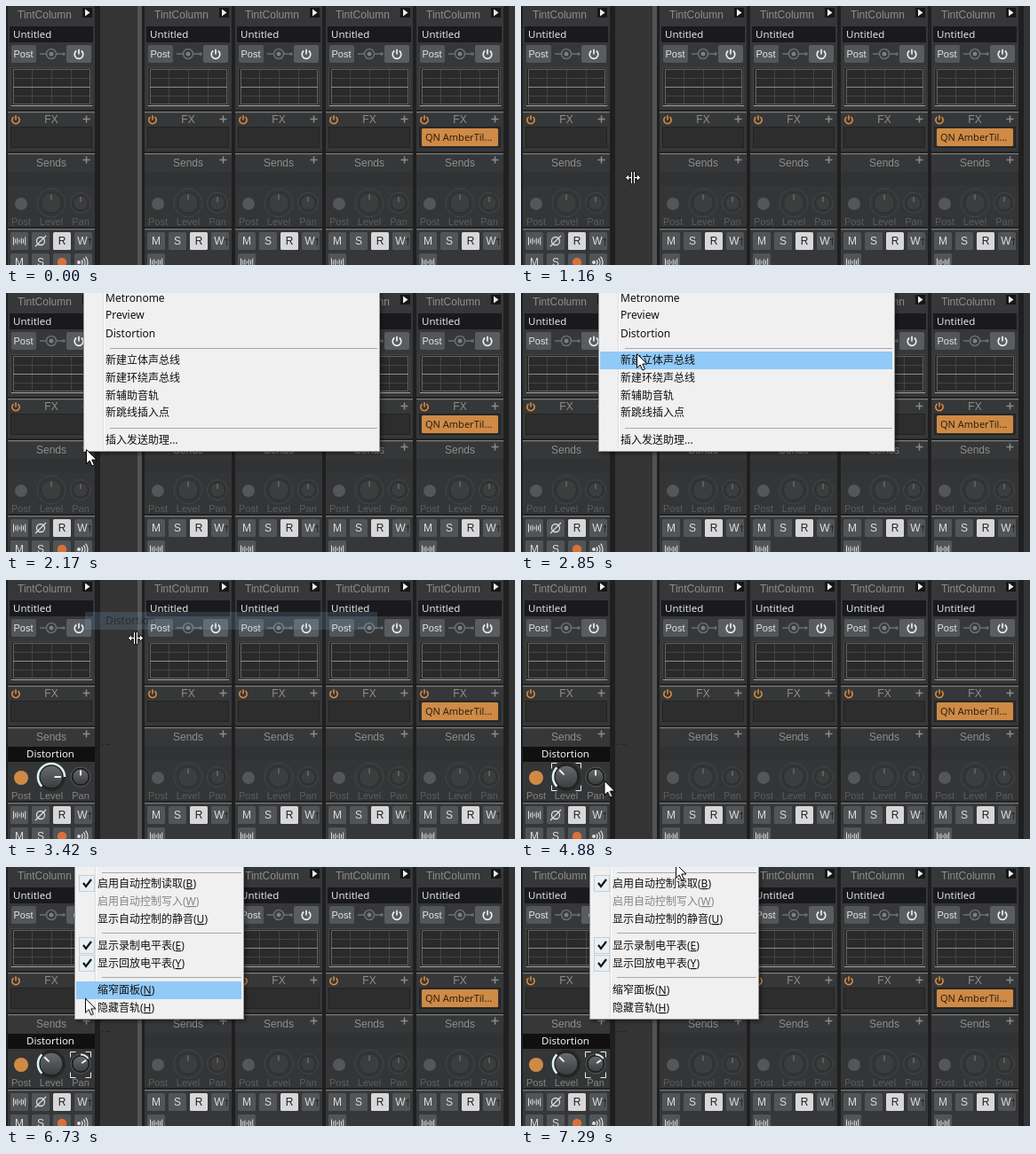
Recreate the animation shown at these times as an HTML page. Size 573x292 px, loop 8000 ms.

```html
<!DOCTYPE html>
<html lang="zh">
<head>
<meta charset="utf-8">
<title>Mixer console</title>
<style>
html, body { margin: 0; width: 100%; height: 100%; overflow: hidden; background: #343435; }
svg { display: block; width: 573px; height: 292px; }
text { font: 12px "Noto Sans", "Noto Sans CJK SC", sans-serif; }
.ui { font-family: "Liberation Sans", Arial, sans-serif; }
.head { fill: #8e8e8e; }
.small { font-size: 11px; }
.name { font-size: 11.5px; }
.mid { text-anchor: middle; }

.anim, .anim-step { animation: 8s linear infinite; }
.anim-step { animation-timing-function: step-end; }
#cursor { animation-name: travel; }
#arrow { animation-name: arrow; }
#resize { animation-name: resize; }
#idle { animation-name: idle; }
#active { animation-name: active; }
#menuA { animation-name: menuA; }
#menuB { animation-name: menuB; }
#hoverA { animation-name: hoverA; }
#hoverB { animation-name: hoverB; }
#ghost { animation-name: ghost; }
#levelHand { transform-origin: 51px 222px; animation-name: levelHand; }
#levelArc { animation-name: levelArc; }
#panHand { transform-origin: 84px 222px; animation-name: panHand; }
#panArc { animation-name: panArc; }
#levelFrame { animation-name: levelFrame; }
#panFrame { animation-name: panFrame; }

@keyframes travel {
  0%, 5.75% { transform: translate(376px, 296px); }
  10% { transform: translate(250px, 240px); }
  14.5%, 15.3% { transform: translate(126px, 193px); }
  15.4% { transform: translate(110px, 186px); }
  16.25% { transform: translate(100px, 178px); }
  19.5% { transform: translate(79px, 175px); }
  20.5%, 28.75% { transform: translate(90px, 176px); }
  31.25% { transform: translate(110px, 120px); }
  34.75% { transform: translate(128px, 77px); }
  37.4%, 39.25% { transform: translate(134px, 50px); }
  42.75%, 43.6% { transform: translate(146px, 65px); }
  45.5% { transform: translate(165px, 140px); }
  48.9% { transform: translate(177px, 226px); }
  50.6% { transform: translate(120px, 240px); }
  54.6% { transform: translate(46px, 224px); }
  57.5% { transform: translate(30px, 242px); }
  59.25% { transform: translate(56px, 240px); }
  61%, 61.8% { transform: translate(93.5px, 226px); }
  62.5% { transform: translate(88px, 224px); }
  65.6%, 66.5% { transform: translate(92px, 212px); }
  69.75% { transform: translate(214px, 238px); }
  70.6% { transform: translate(204px, 230px); }
  74.1%, 83.25% { transform: translate(78px, 172px); }
  86.25% { transform: translate(115px, 90px); }
  88.75% { transform: translate(150px, 30px); }
  90.25% { transform: translate(168px, 4px); }
  91.1%, 100% { transform: translate(174px, -4px); }
}
@keyframes arrow {
  0%, 15.9%, 44.2%, 51.5%, 68.1%, 73.4%, 100% { opacity: 1; }
  13.5%, 39.4%, 49.6%, 66.8%, 72% { opacity: 0; }
}
@keyframes resize {
  0%, 15.9%, 44.2%, 51.5%, 68.1%, 73.4%, 100% { opacity: 0; }
  13.5%, 39.4%, 49.6%, 66.8%, 72% { opacity: 1; }
}
@keyframes idle { 0% { opacity: 1; } 39.25%, 100% { opacity: 0; } }
@keyframes active { 0% { opacity: 0; } 39.25%, 100% { opacity: 1; } }
@keyframes menuA {
  0%, 25.4% { opacity: 0; }
  25.5% { opacity: .15; }
  27.1%, 39.2% { opacity: 1; }
  39.25%, 100% { opacity: 0; }
}
@keyframes menuB {
  0%, 76.55% { opacity: 0; }
  76.6% { opacity: .1; }
  78.2%, 79.1% { opacity: .3; }
  80%, 100% { opacity: 1; }
}
@keyframes hoverA {
  0%, 29.7% { transform: translateY(-40px); }
  28.9% { transform: translateY(155px); }
  30.1% { transform: translateY(125px); }
  31% { transform: translateY(106px); }
  32.4% { transform: translateY(86px); }
  34% { transform: translateY(66px); }
  36.8%, 100% { transform: translateY(36px); }
}
@keyframes hoverB {
  0%, 84.9%, 86.6%, 90%, 100% { transform: translateY(-40px); }
  83.4% { transform: translateY(149px); }
  84.1% { transform: translateY(129px); }
  85.2% { transform: translateY(99px); }
  85.9% { transform: translateY(79px); }
  87.1% { transform: translateY(49px); }
  87.9% { transform: translateY(29px); }
  88.8% { transform: translateY(9px); }
}
@keyframes ghost {
  0%, 39.24% { opacity: 0; }
  39.25% { opacity: .9; }
  42.7%, 43.6% { opacity: .16; }
  44.5%, 100% { opacity: 0; }
}
@keyframes levelHand {
  0%, 54.6% { transform: rotate(90deg); }
  58.7%, 100% { transform: rotate(-45deg); }
}
@keyframes levelArc {
  0%, 54.6% { stroke-dashoffset: 45; }
  58.7%, 100% { stroke-dashoffset: 180; }
}
@keyframes panHand {
  0%, 62.5% { transform: rotate(0deg); }
  65.6%, 100% { transform: rotate(55deg); }
}
@keyframes panArc {
  0%, 62.5% { stroke-dashoffset: 55; }
  65.6%, 100% { stroke-dashoffset: 0; }
}
@keyframes levelFrame { 0%, 62.5%, 100% { opacity: 0; } 54.6% { opacity: 1; } }
@keyframes panFrame { 0% { opacity: 0; } 62.5%, 100% { opacity: 1; } }
</style>
</head>
<body>
<svg id="stage" viewBox="0 0 573 292" width="573" height="292"></svg>
<script>
const ORANGE = '#cf8a45';

const box = (x, y, w, h, fill, more = '') =>
  `<rect x="${x}" y="${y}" width="${w}" height="${h}" fill="${fill}" ${more}/>`;
const dot = (x, y, r, fill, more = '') =>
  `<circle cx="${x}" cy="${y}" r="${r}" fill="${fill}" ${more}/>`;
const line = (d, color, w = 1, more = '') =>
  `<path d="${d}" fill="none" stroke="${color}" stroke-width="${w}" ${more}/>`;
const label = (x, y, s, fill, cls = '') =>
  `<text x="${x}" y="${y}" fill="${fill}" class="${cls}">${s}</text>`;

// Angles run clockwise from the top.
function arc(cx, cy, r, from, to) {
  const at = a => {
    const t = a * Math.PI / 180;
    return (cx + r * Math.sin(t)).toFixed(2) + ' ' + (cy - r * Math.cos(t)).toFixed(2);
  };
  return `M${at(from)}A${r} ${r} 0 ${to - from > 180 ? 1 : 0} 1 ${at(to)}`;
}

const power = (x, y, r, color, w) =>
  line(arc(x, y, r, 35, 325) + `M${x} ${y - r - 1}V${y}`, color, w);
const plus = (x, y) => line(`M${x - 4} ${y}h8M${x} ${y - 4}v8`, '#8c8c8c', 1.5);
const key = (x, y, fill = '#525557') => box(x, y, 20, 20, fill, 'rx="1.5"');

function letterKey(x, y, s) {
  const on = s === 'R', w = s === 'W';
  return key(x, y, on ? '#d8d8da' : undefined) +
    label(x + (w ? 9 : 10), y + 14, s, on ? '#222' : '#dedede', 'ui mid') +
    (w ? line(`M${x + 17.5} ${y + 6}v9M${x + 15} ${y + 8.5}h4`, '#2a2a2a') : '');
}

function waveKey(x, y) {
  const bars = [9, 5, 7, 3, 7, 5, 9].map((h, i) => `M${x + 3.5 + i * 2.2} ${y + 10 - h / 2}v${h}`);
  return key(x, y) + line(bars.join(''), '#dedede');
}

function divider(y) {
  return box(2, y - 2, 98, 2, '#222') + box(2, y, 98, 1, '#7c7c7c') + box(2, y + 1, 98, 1, '#484848');
}

function sendLabels(fill) {
  return [[17, 'Post'], [51, 'Level'], [84, 'Pan']]
    .map(([x, s]) => label(x, 247, s, fill, 'ui small mid')).join('');
}

function idleKnob(x, r) {
  return dot(x, 222, r, '#343536', 'stroke="#444546"') +
    dot(x, 222, r * .72, '#3c3d3e', 'stroke="#2c2c2c"') + line(`M${x} ${222 - r * .6}v6`, '#666', 1.6);
}

function idleSend(id) {
  return `<g ${id ? `id="${id}" class="anim-step"` : ''}>` +
    box(2, 187, 98, 63, '#343536') + box(2, 187, 98, 16, '#313233') +
    dot(17, 223, 7, '#555657') + idleKnob(51, 16) + idleKnob(84, 11.5) + sendLabels('#5c5d5e') + '</g>';
}

function corners(id, x, y, w, h) {
  const c = 6, r = x + w, b = y + h;
  return line(`M${x} ${y + c}V${y}h${c}M${r - c} ${y}H${r}v${c}M${r} ${b - c}V${b}h${-c}M${x + c} ${b}H${x}v${-c}`,
    '#f0f0f0', 1, `id="${id}" class="anim-step"`);
}

function activeSend() {
  return '<g id="active" class="anim-step">' +
    box(2, 187, 98, 63, '#343536') + box(2, 188, 98, 17, '#101011') +
    label(50, 200, 'Distortion', '#f2f2f2', 'name mid') + dot(17, 223, 8, ORANGE) +
    dot(51, 222, 16, '#262728') + dot(51, 222, 13, 'url(#metal)', 'stroke="#191919"') +
    line(arc(51, 222, 15, -135, 135), '#d9f1f5', 2.6,
      'id="levelArc" class="anim" pathLength="270" stroke-dasharray="270 270"') +
    line('M51 211v7.5', '#fff', 1.8, 'id="levelHand" class="anim"') +
    dot(84, 222, 11, '#262728', 'stroke="#5a5b5c"') + dot(84, 222, 9, 'url(#metal)', 'stroke="#191919"') +
    line(arc(84, 222, 10.5, 0, 55), '#d9f1f5', 2,
      'id="panArc" class="anim" pathLength="55" stroke-dasharray="55 200"') +
    line('M84 214.5v6', '#fff', 1.8, 'id="panHand" class="anim"') +
    sendLabels('#858585') +
    corners('levelFrame', 34.5, 206.5, 33, 31) + corners('panFrame', 72.5, 208.5, 23, 29) +
    box(108, 185, 2, 1, '#222') + box(113, 185, 5, 1, '#222') + '</g>';
}

function strip(x, first, plugin) {
  let s = `<g transform="translate(${x} 0)">` + box(2, 0, 98, 292, '#363738');
  s += label(13, 14, 'TintColumn', '', 'ui head') +
    box(86, 2, 11, 11, '#161616') + '<path d="M89 3.5l5.5 4-5.5 4z" fill="#eee"/>';
  s += box(4, 23, 94, 18, '#1a191e') + label(8, 36, 'Untitled', '#e2e2e2', 'name');

  s += box(6, 44, 28, 20, '#535658', 'rx="2"') + label(19.5, 58, 'Post', '#e4e4e4', 'ui small mid') +
    line('M38 54h27', '#6c6d6e', 1.6) + dot(51, 54, 5.5, '#363738', 'stroke="#6c6d6e" stroke-width="1.6"') +
    dot(51, 54, 2.5, '#7c7d7e') + dot(65, 54, 1.8, '#6c6d6e') +
    box(68, 44, 28, 20, '#5a5d5f', 'rx="2"') + power(82, 54.5, 4.8, '#eee', 1.7);

  s += box(5.5, 69.5, 91, 43, '#2a2a2b', 'stroke="#444445"') +
    line('M9 81.5h85M9 101.5h85M29.5 72v38M51.5 72v38M73.500 72v38', '#444445') +
    line('M8.5 71.5h86v39h-86z', '#626263') + box(8, 91, 87, 1, '#8c8c8c') + box(6, 112, 91, 1, '#a4a4a4');

  s += divider(119) + power(11, 128.5, 4.2, '#d98a42', 1.6) +
    label(51, 132, 'FX', '', 'ui head mid') + plus(90.5, 127.5) +
    box(5.5, 136.5, 91, 23, '#2d2d2e', 'stroke="#222"');
  if (plugin) {
    s += box(8, 138, 86, 20, ORANGE, 'rx="1.5"') + label(12, 152, 'QN AmberTil...', '#2b2118', 'small');
  }
  s += divider(166) + label(51, 181, 'Sends', '', 'ui head mid') + plus(90.5, 173.5);
  s += idleSend(first ? 'idle' : '') + (first ? activeSend() : '') + divider(251);

  if (first) {
    s += waveKey(5, 255) + key(29, 255) +
      dot(39, 265, 4.5, 'none', 'stroke="#dedede" stroke-width="1.3"') + line('M33 271l12-12', '#dedede', 1.3) +
      letterKey(53, 255, 'R') + letterKey(77, 255, 'W') +
      letterKey(5, 279, 'M') + letterKey(29, 279, 'S') +
      key(53, 279) + dot(63, 289, 5.2, '#d9703c') +
      key(77, 279) + dot(82, 289, 2, '#dedede') +
      line([4, 7, 10].map(r => arc(82, 289, r, 50, 130)).join(''), '#dedede', 1.3);
  } else {
    s += ['M', 'S', 'R', 'W'].map((c, i) => letterKey(5 + i * 24, 255, c)).join('') + waveKey(5, 279);
  }
  return s + '</g>';
}

function menu(id, hover, x, w, h, textX, seps, items) {
  let s = `<g id="${id}" class="anim" style="filter:drop-shadow(2px 2px 2px rgba(0,0,0,.45))">` +
    box(x + .5, -4.5, w - 1, h + 4, '#f0f0f0', 'stroke="#979797"') +
    box(textX - 3, 0, 1, h - 2, '#dcdcdc') + box(textX - 2, 0, 1, h - 2, '#fff') +
    box(x + 2, 0, w - 5, 20, '#91c9f7', `id="${hover}" class="anim-step"`);
  for (const y of seps) s += box(textX + 5, y, w - (textX - x) - 8, 1, '#a8a8a8');
  for (const [y, str, mode] of items) {
    const c = y - 4;
    if (mode === 'check') {
      s += box(x + 5.5, c - 9.5, 17, 18, '#e8eff5', 'stroke="#c3d0dc"') +
        line(`M${x + 10} ${c - 1}l3 4 6-8`, '#111', 2.2);
    }
    s += label(textX, y, str.replace(/\((\w)\)/, '(<tspan text-decoration="underline">$1</tspan>)'),
      mode === 'off' ? '#858585' : '#111');
  }
  return s + '</g>';
}

const menuA = menu('menuA', 'hoverA', 87, 334, 179, 112, [62, 152], [
  [10, 'Metronome'], [29, 'Preview'], [50, 'Distortion'],
  [80, '新建立体声总线'], [100, '新建环绕声总线'], [120, '新辅助音轨'], [139, '新跳线插入点'],
  [170, '插入发送助理...']
]);
const menuB = menu('menuB', 'hoverB', 77, 191, 172, 103, [6, 74, 124], [
  [23, '启用自动控制读取(B)', 'check'], [43, '启用自动控制写入(W)', 'off'], [63, '显示自动控制的静音(U)'],
  [93, '显示录制电平表(E)', 'check'], [113, '显示回放电平表(Y)', 'check'],
  [143, '缩窄面板(N)'], [163, '隐藏音轨(H)']
]);

const ghost = '<g id="ghost" class="anim">' + box(89, 36, 329, 20, '#91c9f7') +
  label(112, 50, 'Distortion', '#000') + '</g>';

const halfResize = flip => `<path transform="scale(${flip} 1)" ` +
  'd="M8.5 .5l-4-4v3h-2v-6h-2v14h2v-6h2v3z" fill="#fff" stroke="#000" stroke-width=".8"/>';
const cursor = '<g id="cursor" class="anim">' +
  '<path id="arrow" class="anim-step" d="M.5 .5v16l3.7-3.5 2.6 6 2.6-1.1-2.6-5.9h5.2z" fill="#fff" stroke="#000"/>' +
  `<g id="resize" class="anim-step">${halfResize(1)}${halfResize(-1)}</g></g>`;

const metal = '<defs><linearGradient id="metal" x2="0" y2="1">' +
  '<stop stop-color="#6a6b6c"/><stop offset="1" stop-color="#3a3b3c"/></linearGradient></defs>';

document.getElementById('stage').innerHTML = metal +
  box(0, 0, 573, 292, '#343435') + box(0, 0, 106, 292, '#1f1f20') +
  box(148, 0, 5, 292, '#535355') + box(153, 0, 413, 292, '#1f1f20') +
  [0, 154, 256, 358, 460].map((x, i) => strip(x, i === 0, i === 4)).join('') +
  menuA + ghost + menuB + cursor;
</script>
</body>
</html>
```
